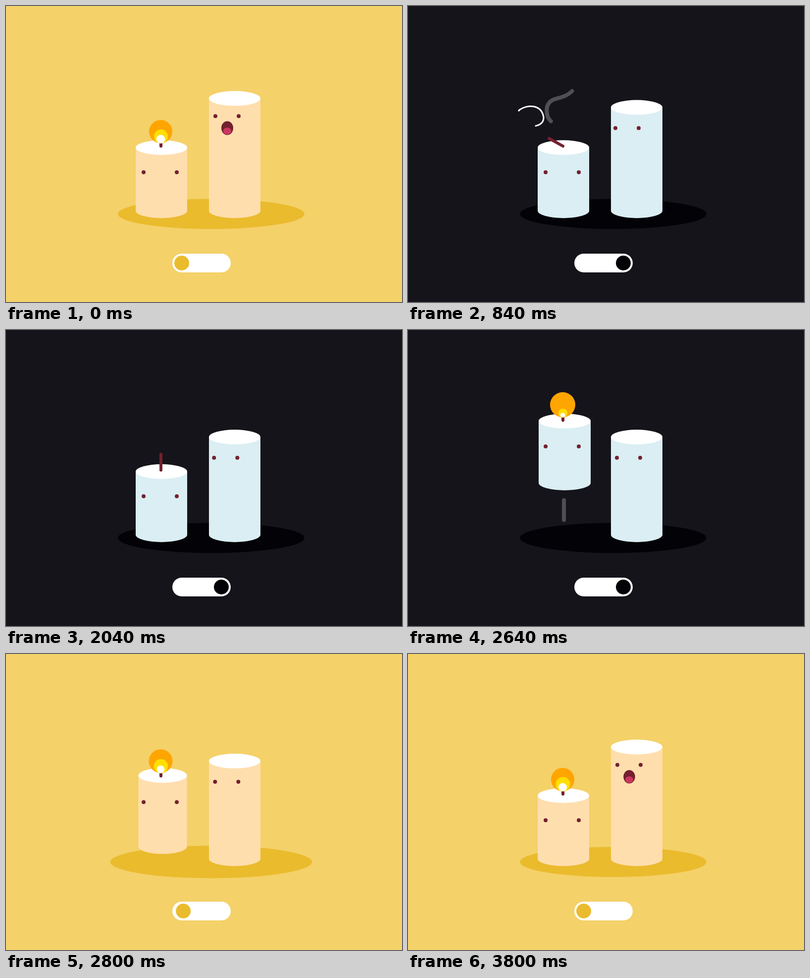
Write an HTML page with a canvas that moves like this. It is 800 px wide and 600 px high and loops after 3840 ms.

```html
<!DOCTYPE html>
<html lang="en">
<head>
<meta charset="utf-8">
<title>Two candles</title>
<style>
  html, body { margin: 0; width: 100%; height: 100%; overflow: hidden; background: #f4d169; }
  canvas { display: block; }
</style>
</head>
<body>
<canvas id="stage" width="800" height="600"></canvas>
<script>
const ctx = document.getElementById('stage').getContext('2d');
const LOOP = 3840, STEP = 40, TAU = Math.PI * 2;
const TAKEOFF = 2250, APEX = 2560, LANDING = 2860, BLOW = 400;
const DAY = { bg: '#f4d169', shadow: '#eabb2d', wax: '#ffdead' };
const NIGHT = { bg: '#15141a', shadow: '#030307', wax: '#daeef3' };
const INK = '#74202f', HAZE = 'rgba(255,255,255,.25)';

const BREATH = new Path2D('M430 261H252C228 261 219 248 218 234C217 222 219 216 226 210' +
  'C240 200 270 198 274 226C274 236 267 241 258 243');
const SMOKE = new Path2D('M315 240Q298 241 288 233C279 224 278 206 284 198' +
  'C292 184 314 190 331 173C345 155 325 130 310 115S290 90 305 70S318 45 312 35');

const lerp = (a, b, u) => a + (b - a) * u;
const progress = (t, from, to) => Math.min(1, Math.max(0, (t - from) / (to - from)));
const smooth = (t, from, to) => (1 - Math.cos(Math.PI * progress(t, from, to))) / 2;
const easeOut = (t, from, to, power = 2) => 1 - (1 - progress(t, from, to)) ** power;
// Rises from 0 to 1 over a..b, falls back over c..d.
const rise = (t, a, b, c, d) => smooth(t, a, b) - smooth(t, c, d);
// A swing that starts at its crest and fades out.
const sway = (x, period, life) => Math.max(0, 1 - x / life) * Math.cos(TAU * x / period);

function ellipse(x, y, rx, ry, color) {
  ctx.fillStyle = color;
  ctx.beginPath();
  ctx.ellipse(x, y, rx, ry, 0, 0, TAU);
  ctx.fill();
}

function stroke(path, width, color) {
  ctx.lineWidth = width;
  ctx.strokeStyle = color;
  ctx.lineCap = 'round';
  ctx.stroke(path);
}

function line(x, y0, y1, width, color) {
  const path = new Path2D();
  path.moveTo(x, y0);
  path.lineTo(x, y1);
  stroke(path, width, color);
}

// Draws the part of a path between two distances along it.
function ribbon(path, from, to, width, color) {
  if (to <= from) return;
  ctx.setLineDash([to - from, 2000]);
  ctx.lineDashOffset = -from;
  stroke(path, width, color);
  ctx.setLineDash([]);
}

function cylinder(x, top, bottom, rx, color) {
  ctx.fillStyle = color;
  ctx.beginPath();
  ctx.moveTo(x - rx, top);
  ctx.lineTo(x + rx, top);
  ctx.lineTo(x + rx, bottom);
  ctx.ellipse(x, bottom, rx, 15, 0, 0, Math.PI);
  ctx.fill();
  ellipse(x, top, rx, 15, '#fff');
}

function drawShadow(t, color) {
  const k = 1 + 0.1 * rise(t, 2650, 2860, 2860, 3440);
  ellipse(414.5, 421.5, 188.5 * k, 30.5 * k, color);
}

function drawFlame(t) {
  const size = 1 - progress(t, 690, 780) + easeOut(t, 2400, 2540);
  const phase = TAU * t / 480;
  const blob = (x, bottom, radius, color) =>
    ellipse(x, bottom - radius * size, radius * size, radius * size, color);
  blob(-0.5, -6, 24.5 - Math.cos(phase), '#ffa500');
  blob(0, -5.5, 11.6 + 3 * Math.cos(phase + 0.6), '#ffdf00');
  blob(-0.5, -5.5, 6.8 + 2 * Math.cos(phase), '#fff');
}

function hop(t, height, fall) {
  const u = t < APEX ? (APEX - t) / (APEX - TAKEOFF) : (t - APEX) / fall;
  return -height * (1 - u * u);
}

function shortPose(t) {
  if (t > TAKEOFF && t < LANDING) {
    const stretch = lerp(-5, 27, ((t - APEX) / 295) ** 2);
    const middle = 351 + hop(t, 112.6, 285);
    return { stretch, dy: hop(t, 109, 295), bottom: Math.min(415, middle + 64 + stretch / 2) };
  }
  const crouch = 29 * rise(t, 2060, 2210, 2210, TAKEOFF);
  const bounce = t < LANDING ? 0 : 24 * sway(t - LANDING, 260, 400);
  const stretch = -crouch - bounce;
  return { stretch, dy: -stretch, bottom: 415 };
}

function drawShort(t, wax) {
  const { stretch, dy, bottom } = shortPose(t);
  const height = 128 + stretch;
  const x = 314 + 2.5 * rise(t, TAKEOFF, 2600, 2800, 2930);
  cylinder(x, bottom - height, bottom, 52 * Math.sqrt(128 / height), wax);

  const open = 1 - rise(t, 460, 560, 720, 800);
  for (const eye of [278, 345]) ellipse(eye, 337 + dy, 4, 4 * open, INK);

  const lean = -61 * rise(t, 608, 840, 900, 1600);
  ctx.save();
  ctx.translate(313, 284 + dy);
  ctx.rotate(lean * Math.PI / 180);
  line(0, 0, -32, 6, INK);
  drawFlame(t);
  ctx.restore();
}

function tallLift(t) {
  if (t >= BLOW && t < 2000) return 45 * sway(t - BLOW, 377, 900);
  const late = t < BLOW ? t + LOOP : t;
  return 32 * easeOut(late, 3400, 4000) + 13 * smooth(late, 4000, LOOP + BLOW);
}

function drawTall(t, wax) {
  const lift = tallLift(t), top = 217 - lift;
  cylinder(462, top, 415, 52 + 0.36 * Math.max(0, -lift), wax);

  const mouth = 1 - smooth(t, 500, 650) + easeOut(t, 3420, 3860);
  const glance = 4 * (1 - smooth(t, 540, 650) + easeOut(t, 1700, 3400, 1.75));
  const eyeY = top + 42 - 6 * mouth;
  for (const eye of [419, 466]) ellipse(eye + glance, eyeY, 4, 4, INK);

  const mouthY = eyeY + 24.2;
  ctx.save();
  ctx.beginPath();
  ctx.ellipse(447, mouthY, 12 * mouth, 14 * mouth, 0, 0, TAU);
  ctx.clip();
  ellipse(447, mouthY, 13, 15, INK);
  ellipse(447, mouthY + 6 * mouth, 8.3 * mouth, 7 * mouth, '#c9375f');
  ctx.restore();
}

function drawAir(t) {
  const since = t - 680;
  ribbon(BREATH, Math.max(0, 139 + 0.694 * since), Math.min(350, 223 + 0.79 * since), 3, '#fff');

  const smokeTail = 48 * easeOut(t, 680, 1120, 1.9) + 222 * progress(t, 1120, 1660) ** 2;
  ribbon(SMOKE, smokeTail, Math.min(270, 29 + 0.575 * since), 8, HAZE);

  const trailHead = lerp(410, 345, progress(t, 2320, 2600));
  const trailTail = lerp(410, 345, progress(t, 2400, 2730) ** 3);
  if (trailTail > trailHead) line(315, trailHead, trailTail, 8, HAZE);
}

function drawSwitch(t) {
  const on = rise(t, 612, 782, 2650, 2822);
  const dim = progress(t, 612, 782) - progress(t, 2640, 2780);
  const mix = (a, b) => Math.round(lerp(a, b, dim));
  ctx.fillStyle = '#fff';
  ctx.beginPath();
  ctx.roundRect(336, 502, 118, 38, 19);
  ctx.fill();
  ellipse(355 + 80 * on, 521, 15, 15, `rgb(${mix(234, 3)},${mix(187, 3)},${mix(45, 7)})`);
}

function draw(t) {
  const mood = t >= 720 && t < 2720 ? NIGHT : DAY;
  ctx.fillStyle = mood.bg;
  ctx.fillRect(0, 0, 800, 600);
  drawShadow(t, mood.shadow);
  drawShort(t, mood.wax);
  drawTall(t, mood.wax);
  drawAir(t);
  drawSwitch(t);
}

const start = performance.now();
function tick() {
  const t = (performance.now() - start) % LOOP;
  draw(Math.floor(t / STEP) * STEP);
  requestAnimationFrame(tick);
}
tick();
</script>
</body>
</html>
```
